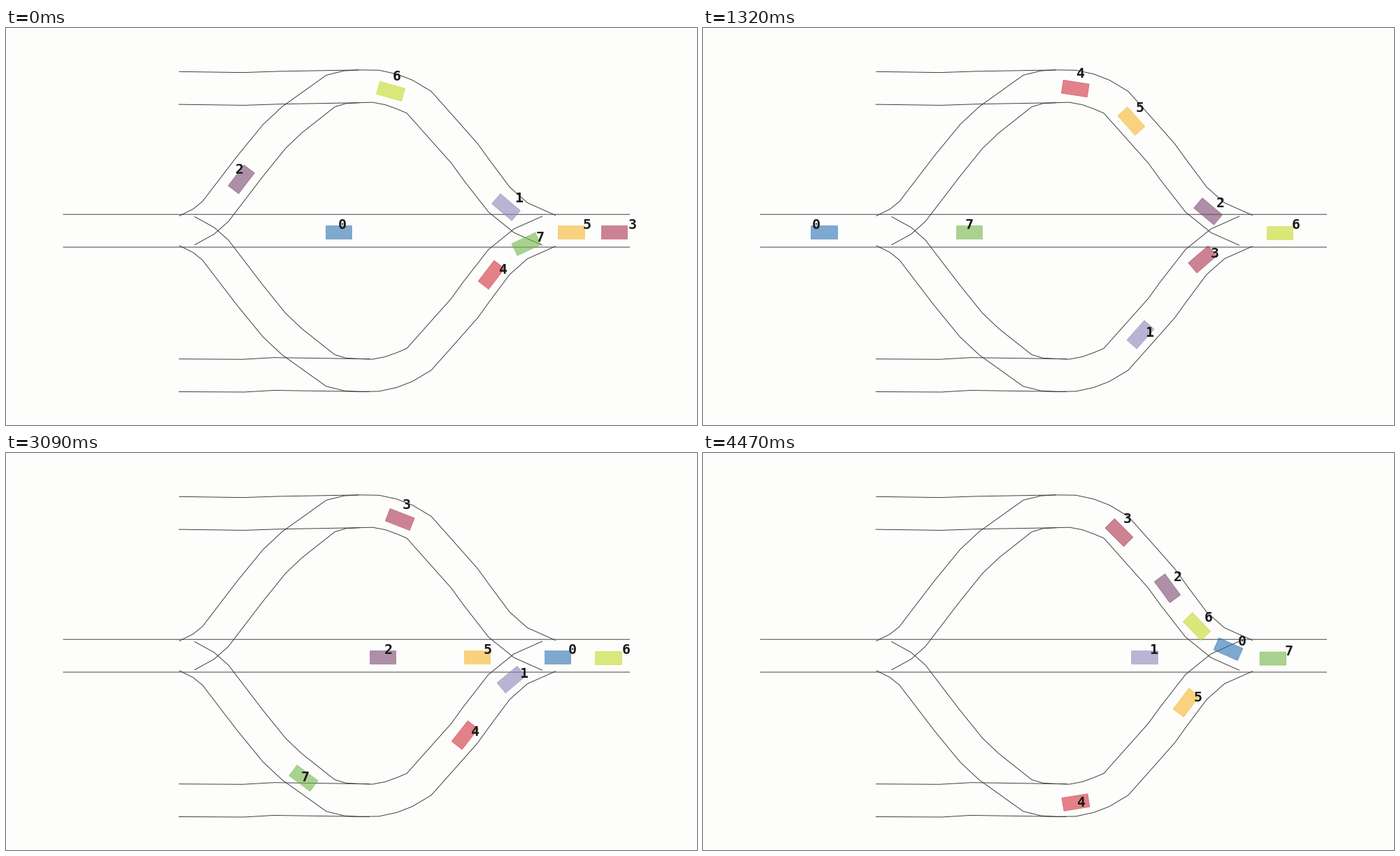
Animation of 988 by 567 pixels, one loop 4.5 s. Source, as a matplotlib script:

```python
import numpy as np
import matplotlib.pyplot as plt
from matplotlib.animation import FuncAnimation
from matplotlib.patches import Polygon

W, H, DPI = 988, 567, 100
FRAMES, INTERVAL = 150, 30
BG = np.array([253, 254, 252])
PX = 72 / DPI            # points per pixel
AXIS = 289.6             # the road is mirrored about this height
LANE = 46.8
EXIT = 872
CAR_L, CAR_W, ALPHA = 37.5, 19, 0.6

fig = plt.figure(figsize=(W / DPI, H / DPI), dpi=DPI, facecolor=BG / 255)
ax = fig.add_axes([0, 0, 1, 1])
ax.set_xlim(0, W)
ax.set_ylim(H, 0)
ax.axis("off")


# ---- road ----
def mirror(points):
    return [(x, 2 * AXIS - y) for x, y in points]


def draw_lane(centre):
    """Two edges, each point offset square to the segment that follows."""
    pts = np.array(centre, float)
    step = np.diff(pts, axis=0)
    step = np.vstack([step, step[-1]])
    normal = np.column_stack([-step[:, 1], step[:, 0]])
    normal *= LANE / 2 / np.hypot(*step.T)[:, None]
    for edge in (pts - normal, pts + normal):
        ax.plot(*edge.T, color="#383838", lw=0.95 * PX, zorder=1, snap=False,
                solid_capstyle="butt")


arch = [(258.5, 289.2), (282.5, 276.5), (299.5, 262), (348.5, 198),
        (383.5, 155), (409, 131), (464, 90), (484.5, 84.5), (505, 83.3),
        (528.5, 83.2), (550.5, 87.7), (570, 95), (590.5, 106), (623.5, 143),
        (655.5, 179), (672.5, 202.5), (705, 245), (736, 271), (776.5, 289)]
upper_siding = [(247, 85.7), (339.5, 87), (390, 85.3), (505, 83.3)]
lower_siding = [(247, 496.1), (339.5, 496.6), (383, 494.1), (520, 496.1)]
straight = [(81.5, AXIS), (892, AXIS)]

for lane in (arch, mirror(arch), upper_siding, lower_siding, straight):
    draw_lane(lane)


# ---- routes ----
class Route:
    """Driving line as a height over x, measured by arc length."""

    def __init__(self, centre, drop):
        ends = [(60, AXIS)], [(800, AXIS), (920, AXIS)]
        self.x = np.arange(60, 921.0)
        y = np.interp(self.x, *zip(*ends[0], *centre, *ends[1])) + drop
        kernel = np.hanning(23)
        padded = np.pad(y, 11, mode="edge")
        self.y = np.convolve(padded, kernel / kernel.sum(), "valid")
        steps = np.hypot(np.diff(self.x), np.diff(self.y))
        self.s = np.concatenate([[0], np.cumsum(steps)])

    def length(self, x):
        return np.interp(x, self.x, self.s)

    def pose(self, s):
        x = np.interp(s, self.s, self.x)
        back, y, ahead = np.interp([x - 6, x, x + 6], self.x, self.y)
        return np.array([x, y]), np.arctan2(ahead - back, 12)


# cars keep a little below the lane centre
UP = Route(arch, 2.5)
DOWN = Route(mirror(arch), 4)
MID = Route([], 2)


class Run:
    """One drive along a route, from x at the start frame.

    A pace below 1 slows down towards the merge, above 1 speeds up;
    hold is a wait before setting off.
    """

    def __init__(self, route, start, x, pace=1, hold=0):
        self.route, self.start, self.x = route, start, x
        self.pace, self.hold = pace, hold

    def finish(self, end, x):
        self.end, self.goal = end, x

    def pose(self, frame):
        depart = self.start + self.hold
        u = np.clip((frame - depart) / (self.end - depart), 0, 1) ** self.pace
        a, b = self.route.length([self.x, self.goal])
        return self.route.pose(a + (b - a) * u)


# ---- cars ----
class Car:
    """Drives its runs in turn; each ends at the exit, the last at stop."""

    def __init__(self, name, shade, stop, *runs):
        self.runs = runs
        for run, following in zip(runs, runs[1:]):
            run.finish(following.start, EXIT)
        runs[-1].finish(FRAMES - 1, stop)

        rgb = np.array([int(shade[i:i + 2], 16) for i in (1, 3, 5)])
        base = np.clip((rgb - (1 - ALPHA) * BG) / ALPHA / 255, 0, 1)
        self.body = Polygon(np.zeros((4, 2)), closed=True, facecolor=base,
                            edgecolor=base, alpha=ALPHA, lw=0.7 * PX,
                            zorder=2)
        ax.add_patch(self.body)
        self.label = ax.text(0, 0, name, family="DejaVu Sans Mono",
                             weight="bold", size=20 * PX, color="#1a1a1a",
                             ha="center", va="baseline", zorder=3)

    def place(self, frame):
        run = [r for r in self.runs if r.start <= frame][-1]
        spot, angle = run.pose(frame)
        c, s = np.cos(angle), np.sin(angle)
        along = np.array([c, s]) * CAR_L / 2
        across = np.array([-s, c]) * CAR_W / 2
        self.body.set_xy([spot + i * along + j * across
                          for i, j in ((1, 1), (1, -1), (-1, -1), (-1, 1))])
        # labels sit on a slightly larger scale than the road
        self.label.set_position(1.0527 * spot - 20)


cars = [
    Car("0", "#7ea8cd", 751,
        Run(MID, 0, 475.5, pace=0.95), Run(MID, 37, 152, hold=5),
        Run(UP, 111, 625, pace=0.64)),
    Car("1", "#bab4d3", 631,
        Run(UP, 0, 715, pace=1.86), Run(DOWN, 25, 438), Run(DOWN, 71, 444),
        Run(MID, 117, 556), Run(MID, 145, 588)),
    Car("2", "#ae8fa8", 664,
        Run(UP, 0, 336.5, pace=0.97), Run(MID, 58, 135, pace=0.97, hold=9),
        Run(UP, 134, 541)),
    Car("3", "#cb8394", 595,
        Run(MID, 0, 869.5), Run(DOWN, 1, 349), Run(UP, 59, 143, pace=0.92),
        Run(UP, 141, 514)),
    Car("4", "#e28188", 533,
        Run(DOWN, 0, 694, pace=0.9), Run(UP, 18, 300, pace=0.9),
        Run(DOWN, 86, 509), Run(DOWN, 127, 338)),
    Car("5", "#f8d27e", 691,
        Run(MID, 0, 808), Run(UP, 6, 658), Run(UP, 31, 481),
        Run(MID, 73, 342), Run(DOWN, 121, 433)),
    Car("6", "#dae77b", 706,
        Run(UP, 0, 550, pace=0.75), Run(UP, 52, 403),
        Run(UP, 104, 465, pace=0.55)),
    Car("7", "#a9d390", 815,
        Run(DOWN, 0, 744), Run(DOWN, 12, 691), Run(MID, 30, 240),
        Run(DOWN, 93, 348, pace=0.97)),
]


def draw(frame):
    for car in cars:
        car.place(frame)
    return [part for car in cars for part in (car.body, car.label)]


anim = FuncAnimation(fig, draw, frames=FRAMES, interval=INTERVAL,
                     repeat=True, repeat_delay=0, blit=False)
plt.show()
```
